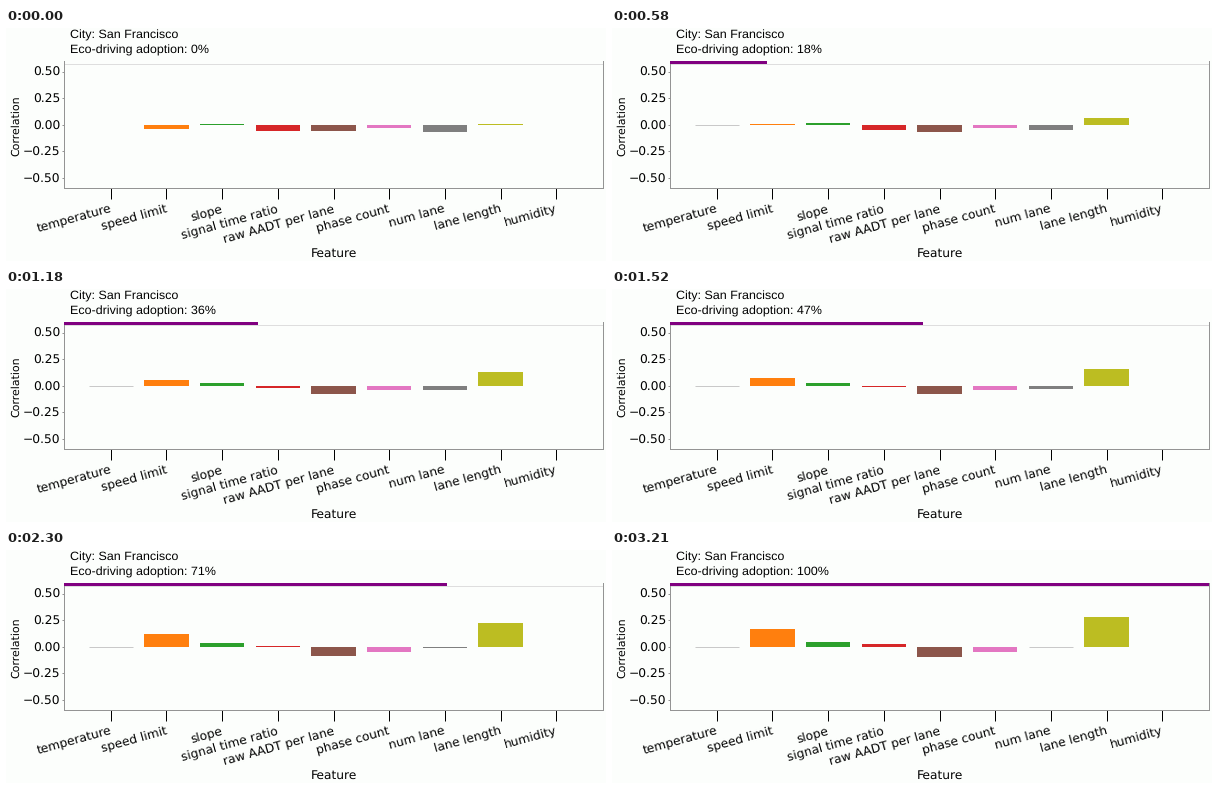
A matplotlib script for the animation above (3.27 s loop, 600x233 px).

```python
import matplotlib.pyplot as plt
import numpy as np
from matplotlib.animation import FuncAnimation
from matplotlib.patches import Rectangle

W, H, DPI = 600, 233, 100
STEP, FRAMES = 30, 109
PT = 72 / DPI
INK, GREY, FAINT = "black", "#949494", "#c9c9c9"
LEFT, RIGHT, TOP, BOTTOM = 58, 597, 33, 160

# correlation at low and at full adoption
FEATURES = {
    "temperature": (0, 0),
    "speed limit": (-.035, .172),
    "slope": (.008, .047),
    "signal time ratio": (-.062, .029),
    "raw AADT per lane": (-.056, -.1),
    "phase count": (-.03, -.05),
    "num lane": (-.065, 0),
    "lane length": (.01, .285),
}
NAMES = [*FEATURES, "humidity"]
COLORS = [f"C{i}" for i in range(len(FEATURES))]
COLORS[3:] = [f"C{i}" for i in (3, 5, 6, 7, 8)]

plt.rcParams["text.hinting"] = "no_hinting"
fig = plt.figure(figsize=(W / DPI, H / DPI), dpi=DPI, facecolor="#fcfefc")
ax = fig.add_axes([LEFT / W, 1 - BOTTOM / H, (RIGHT - LEFT) / W, (BOTTOM - TOP) / H])
ax.set_facecolor("none")
ax.set(xlim=(-.84, 8.84), ylim=(-.594, .6))


def label(x, y, text, size=12.2, font="DejaVu Sans", **kw):
    return fig.text(x / W, 1 - y / H, text, fontsize=size * PT, family=font,
                    color=INK, va="baseline", **kw)


def percent(i):
    return min(100, (STEP * i + 20) * 10 // 323)


def growth(p):
    """Steady up to 10 percent, then rising ever more slowly."""
    return max(0, (p - 10) / 90) ** .7


for spine in ax.spines.values():
    spine.set(color=GREY, linewidth=PT)
ax.spines["top"].set_visible(False)

ax.set_xticks(range(len(NAMES)), [""] * len(NAMES))
ax.set_yticks(np.linspace(-.5, .5, 5))
ax.yaxis.set_major_formatter(lambda v, _: f"{v:.2f}".replace("-", "\u2212"))
ax.tick_params("x", length=11 * PT, width=PT, color=INK)
ax.tick_params("y", length=2 * PT, width=PT, color=GREY, pad=1.5 * PT,
               labelsize=12.2 * PT, labelcolor=INK, labelfontfamily="DejaVu Sans")

for i, name in enumerate(NAMES):
    x = LEFT + (i + .84) / 9.68 * (RIGHT - LEFT)
    label(x + 1, 183.5, name, rotation=15.5, ha="right", rotation_mode="anchor")
label(327.5, 229, "Feature", ha="center")
label(13.5, 97.5, "Correlation", 11, rotation=90, ha="center", rotation_mode="anchor")
label(63.5, 11, "City: San Francisco", 12.48, "Liberation Sans")
status = label(63.5, 26, "", 12.48, "Liberation Sans")

unit = 1 / (BOTTOM - TOP)
ax.plot([0, 1], [1 - 2.5 * unit] * 2, color="#dedede", lw=PT, transform=ax.transAxes)
progress = ax.add_patch(Rectangle((0, 1 - 3 * unit), 0, 3 * unit, fc="purple", lw=0,
                                  transform=ax.transAxes, clip_on=False, zorder=3))
bars = ax.bar(range(len(FEATURES)), 0, color=COLORS, edgecolor=FAINT)


def draw(i):
    p = percent(i)
    g = growth(p)
    status.set_text(f"Eco-driving adoption: {p}%")
    progress.set_width(p / 100)
    for bar, (low, full) in zip(bars, FEATURES.values()):
        v = low + (full - low) * g
        bar.set_height(v)
        # a bar of no height shows as a thin line
        bar.set_linewidth(PT if g > 0 and abs(v) < .003 else 0)
    return [status, progress, *bars]


anim = FuncAnimation(fig, draw, frames=FRAMES, interval=STEP, repeat=True, repeat_delay=0)
plt.show()
```
